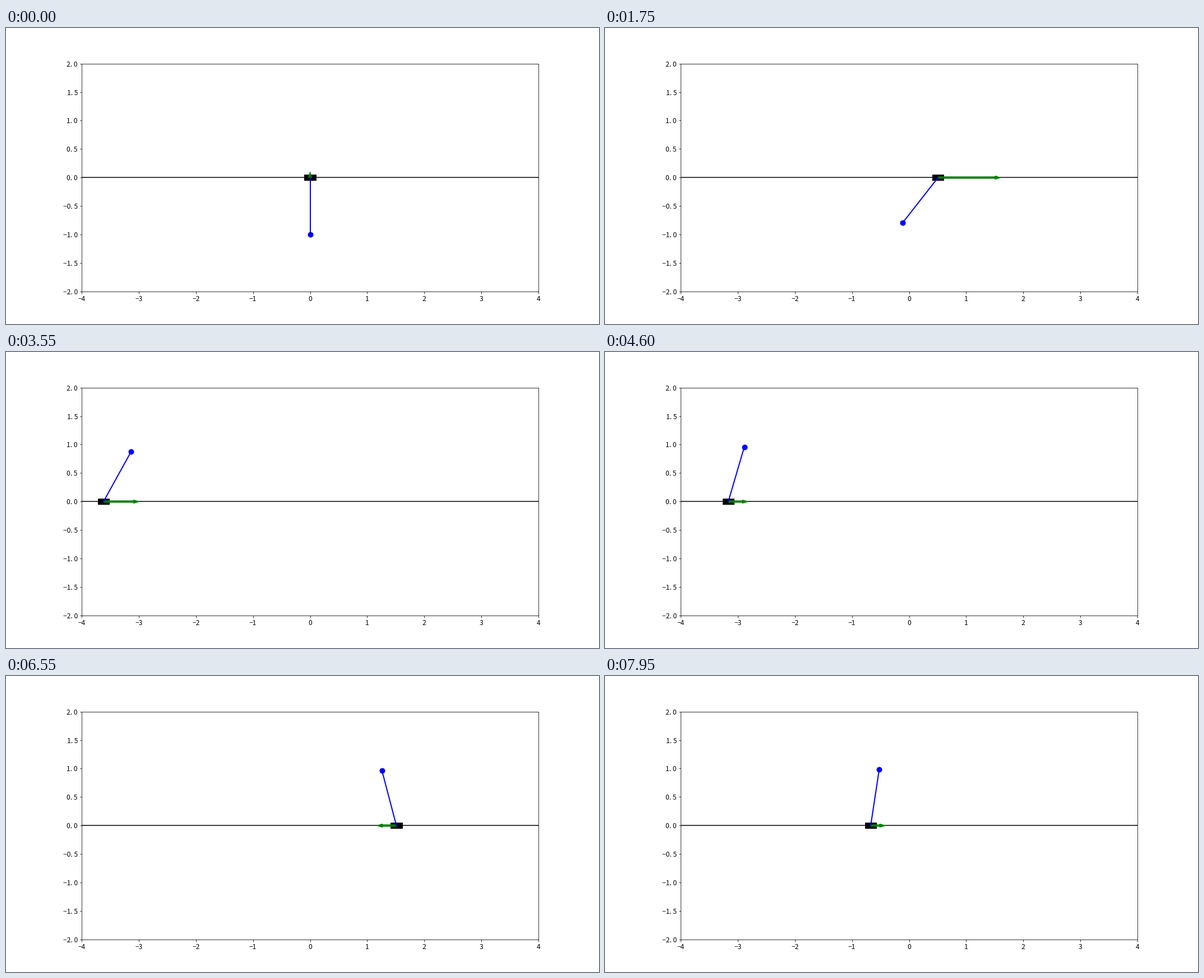
Animation, 1058 px wide and 529 px high, one loop 8 s. Source, as a matplotlib script:

```python
import matplotlib.pyplot as plt
import numpy as np
from matplotlib.animation import FuncAnimation
from matplotlib.patches import Rectangle

W, H, DPI = 1058, 529, 72
FRAMES, STEP_MS = 160, 50
CART_W, CART_H = 0.2, 0.1
PUSH_START, BALANCE_START = 21, 57

# Key poses: step, cart position, pole angle (degrees clockwise from down)
POSES = np.array([
    (21, 0.04, 1.1), (28, -0.18, -23), (34, 0.32, 26), (40, 1.6, 93),
    (48, 2.209, 126.8), (57, 0.58, 155), (71, -3.618, 208.9),
    (81, -4.72, 220), (92, -3.166, 196.3), (102, -0.977, 178.5),
    (110, 0.84, 154), (120, 1.63, 160), (131, 1.512, 165.3),
    (145, 0.26, 179.5), (159, -0.672, 188.6),
])


def natural_spline(kt, kv, t):
    """Natural cubic spline through the rows of kv, evaluated at t."""
    h = np.diff(kt)
    system = np.eye(len(kt))
    for i in range(1, len(kt) - 1):
        system[i, i - 1:i + 2] = h[i - 1], 2 * (h[i - 1] + h[i]), h[i]
    rhs = np.zeros_like(kv)
    rhs[1:-1] = 6 * np.diff(np.diff(kv, axis=0) / h[:, None], axis=0)
    curve = np.linalg.solve(system, rhs)
    i = np.clip(np.searchsorted(kt, t, side="right") - 1, 0, len(h) - 1)
    a = ((kt[i + 1] - t) / h[i])[:, None]
    b = 1 - a
    bend = (a ** 3 - a) * curve[i] + (b ** 3 - b) * curve[i + 1]
    return a * kv[i] + b * kv[i + 1] + bend * h[i][:, None] ** 2 / 6


steps = np.arange(FRAMES)
poses = natural_spline(POSES[:, 0], POSES[:, 1:], steps)
# Slow drift before the first push
drift = steps[:PUSH_START, None] / PUSH_START
poses[:PUSH_START] = drift * POSES[0, 1:]

cart_x = poses[:, 0]
angle = np.radians(poses[:, 1])
lean = -np.sin(angle)
bob_x, bob_y = cart_x + lean, -np.cos(angle)

# Full pushes swing the pole up, then the force follows the lean
force = np.interp(steps, [PUSH_START, 28, 36, 37], [-1, 1, 1, -1])
force[:PUSH_START] = 0
force = np.where(steps < BALANCE_START, force, lean + np.gradient(lean))


def label(value, digits):
    text = f"{value:.{digits}f}".replace("-", "\u2212")
    return text.replace(".", ". ")


plt.rcParams["font.family"] = "Noto Sans CJK JP"
plt.rcParams["font.size"] = 12

fig = plt.figure(figsize=(W / DPI, H / DPI), dpi=DPI)
ax = fig.add_axes([135 / W, 57.9 / H, 815 / W, 407.5 / H])
ax.set(xlim=(-4, 4), ylim=(-2, 2))
x_ticks = np.arange(-4, 5)
y_ticks = np.arange(-2, 2.1, 0.5)
ax.set_xticks(x_ticks, [label(v, 0) for v in x_ticks])
ax.set_yticks(y_ticks, [label(v, 1) for v in y_ticks])
ax.tick_params(labelsize=12)

ax.axhline(0, color="black", lw=1.5, zorder=1)
cart = ax.add_patch(Rectangle((-CART_W / 2, -CART_H / 2), CART_W, CART_H,
                              color="black", zorder=1.2))
arrow = ax.arrow(0, 0, 0, 0, width=0.03, head_width=0.06, head_length=0.1,
                 color="green", zorder=1.4)
pole, = ax.plot([], [], color="blue", lw=2)
bob, = ax.plot([], [], "o", color="blue", ms=9)


def draw(n):
    x = cart_x[n]
    cart.set_x(x - CART_W / 2)
    arrow.set_data(x=x, y=0, dx=force[n], dy=0)
    pole.set_data([x, bob_x[n]], [0, bob_y[n]])
    bob.set_data([bob_x[n]], [bob_y[n]])
    return cart, arrow, pole, bob


anim = FuncAnimation(fig, draw, frames=FRAMES, interval=STEP_MS,
                     repeat=True, repeat_delay=0)
plt.show()
```
